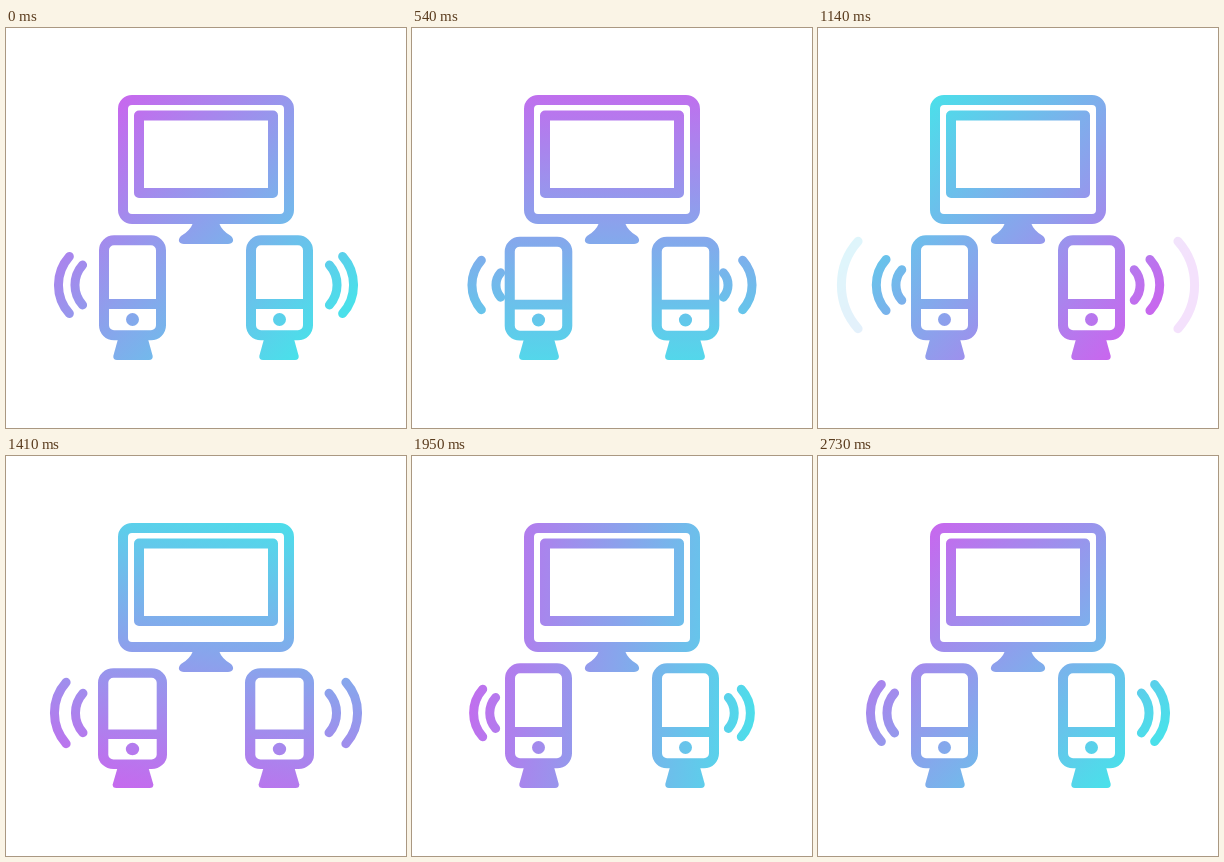
Animation of 400x400 px, one loop 4.79 s. Source, as an HTML page:

```html
<!DOCTYPE html>
<html lang="en">
<head>
<meta charset="utf-8">
<title>Connected devices</title>
<style>
  html, body { margin: 0; width: 100%; height: 100%; overflow: hidden; background: #fff; }
  svg { display: block; width: 100vw; height: 100vh; }
</style>
</head>
<body>
<svg viewBox="0 0 400 400">
  <defs>
    <linearGradient id="tint" gradientUnits="userSpaceOnUse" x1="90" y1="90" x2="310" y2="310">
      <stop offset="0" stop-color="#c867ee"/>
      <stop offset="1" stop-color="#4ae0ea"/>
    </linearGradient>
    <mask id="shapes" maskUnits="userSpaceOnUse" x="0" y="0" width="400" height="400">
      <g fill="none" stroke="#fff" stroke-width="10" stroke-linejoin="round" stroke-linecap="round">
        <rect x="117" y="72" width="166" height="119" rx="9"/>
        <rect x="133" y="87.5" width="134" height="77.5"/>
        <path d="M187 195H213Q216 203 225 208C229 212 227 216 222 216H178C173 216 171 212 175 208Q184 203 187 195Z" fill="#fff" stroke="none"/>
        <g id="side">
          <g id="waves" stroke-width="9"></g>
          <g id="phone">
            <rect x="98" y="212.3" width="57" height="95" rx="10" fill="#000"/>
            <path d="M100 276H153" stroke-linecap="butt"/>
            <circle cx="126.5" cy="291.5" r="6.5" fill="#fff" stroke="none"/>
            <path d="M112 311H142L146.7 328Q147 332 143 332H111Q107 332 107.3 328Z" fill="#fff" stroke="none"/>
          </g>
        </g>
        <use href="#side" transform="translate(400 0) scale(-1 1)"/>
      </g>
    </mask>
  </defs>
  <rect width="400" height="400" fill="url(#tint)" mask="url(#shapes)"/>
</svg>
<script>
const LOOP = 4790, ACTIVE = 2730, STEP = 30;
const $ = id => document.getElementById(id);
const clamp = v => Math.min(1, Math.max(0, v));

// Left edge of each wave as [ms, x]; "end" is when it starts to fade.
const waves = [
  { keys: [[0, 52.5], [400, 19.5]], end: 400 },
  { keys: [[0, 69], [540, 60], [930, 33], [1080, 23.5]], end: 1080 },
  { keys: [[420, 104], [540, 84], [930, 66], [1410, 48.5], [1620, 47.5]], end: 1620 },
  { keys: [[800, 104], [930, 84.5], [1410, 69.5], [1710, 65], [2250, 57.5], [2730, 52.5]], end: LOOP },
  { keys: [[1590, 104], [1710, 84], [2250, 70], [2730, 69]], end: LOOP }
];
// Phone squashes as [centre ms, half width ms, strength].
const squashes = [[420, 190, 1], [800, 120, 1], [1420, 190, 1]];

for (const wave of waves) {
  wave.path = document.createElementNS("http://www.w3.org/2000/svg", "path");
  $("waves").append(wave.path);
}

function along(keys, t) {
  for (let i = 1; i < keys.length; i++) {
    const [t0, x0] = keys[i - 1], [t1, x1] = keys[i];
    if (t <= t1) return x0 + (x1 - x0) * clamp((t - t0) / (t1 - t0));
  }
  return keys[keys.length - 1][1];
}

const bezier = (a, b, s) => 3 * s * (1 - s) * ((1 - s) * a + s * b) + s ** 3;

function ease(x) {
  let lo = 0, hi = 1;
  for (let i = 0; i < 24; i++) {
    const mid = (lo + hi) / 2;
    if (bezier(.34, .45, mid) < x) lo = mid; else hi = mid;
  }
  return bezier(0, 1, lo);
}

function drawWave({ keys, end, path }, t) {
  const x = along(keys, t), half = 12.2 + .52 * (84 - x);
  const tip = x + .38 * half, r = 1.5 * half;
  path.setAttribute("d", `M${tip} ${257 - half}A${r} ${r} 0 0 0 ${tip} ${257 + half}`);
  path.setAttribute("opacity", t < keys[0][0] ? 0 : clamp(1 - (t - end) / 75));
}

function drawPhone(t) {
  let k = 0;
  for (const [mid, half, strength] of squashes) {
    const d = Math.abs(t - mid) / half;
    if (d < 1) k += strength * Math.cos(d * Math.PI / 2) ** 2;
  }
  $("phone").setAttribute("transform",
    `translate(126.5 332) scale(${1 + .03 * k} ${1 - .04 * k}) translate(-126.5 -332)`);
}

function drawTint(t) {
  const angle = Math.PI * (.25 + 2 * ease(t / ACTIVE));
  const dx = 155 * Math.cos(angle), dy = 155 * Math.sin(angle);
  const ends = { x1: 200 - dx, y1: 200 - dy, x2: 200 + dx, y2: 200 + dy };
  for (const name in ends) $("tint").setAttribute(name, ends[name]);
}

const start = performance.now();

function frame() {
  const now = Math.max(0, performance.now() - start) % LOOP;
  const t = Math.min(ACTIVE, Math.floor(now / STEP) * STEP);
  for (const wave of waves) drawWave(wave, t);
  drawPhone(t);
  drawTint(t);
  requestAnimationFrame(frame);
}
frame();
</script>
</body>
</html>
```
